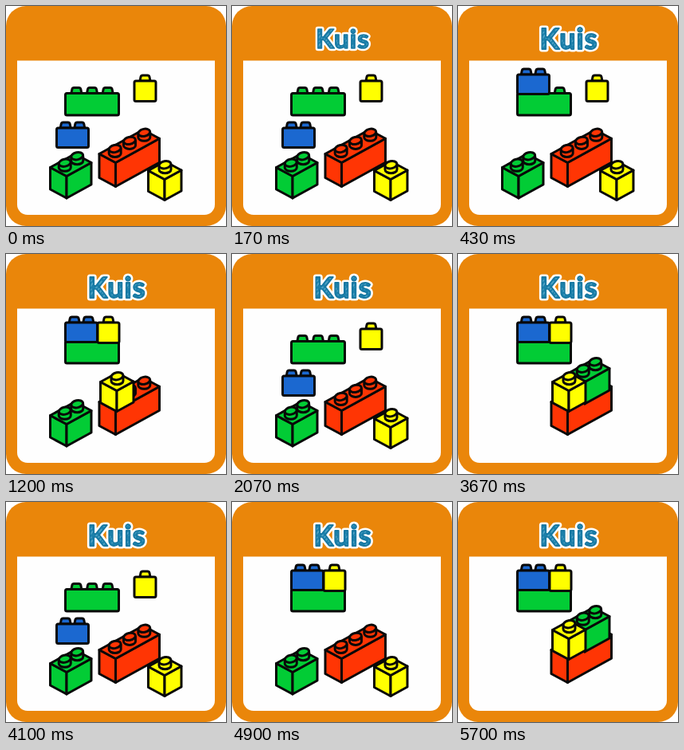
An HTML page for the animation above (6.11 s loop, 276 by 276 pixels).

```html
<!DOCTYPE html>
<html lang="id">
<head>
<meta charset="utf-8">
<title>Kuis</title>
<style>
  html, body { margin: 0; width: 100%; height: 100%; overflow: hidden; background: #fff; }
  svg { display: block; width: 100vw; height: 100vh; }
  #bricks { stroke: #080808; stroke-width: 3; stroke-linejoin: round; }
  text { font: 700 36px Lato, "Open Sans", sans-serif; text-anchor: middle; letter-spacing: 1px; stroke-linejoin: round; }
</style>
</head>
<body>
<svg viewBox="0 0 276 276">
  <defs>
    <pattern id="brush" width="9" height="7" patternUnits="userSpaceOnUse" patternTransform="rotate(-50)">
      <rect width="9" height="7" fill="#1b80ab"/>
      <path d="M1 2H6M4 5.3H8" stroke="#7cc3de" stroke-linecap="round"/>
    </pattern>
  </defs>
  <rect width="276" height="276" rx="25" fill="#ea860a"/>
  <path d="M14 68.6H262V249a13 13 0 0 1-13 13H27a13 13 0 0 1-13-13Z" fill="#fefefe"/>
  <g id="bricks"></g>
  <g id="title">
    <text x="139" y="54.5" fill="#fff" stroke="#fff" stroke-width="7">Kuis</text>
    <text x="139" y="54.5" fill="url(#brush)" stroke="#1778a2" stroke-width="1.8">Kuis</text>
  </g>
</svg>
<script>
const LOOP = 6110, STEP = 400, CYCLES = [0, 2070, 4100];
const GREEN = '#02cc35', BLUE = '#1b68d0', YELLOW = '#ffff00', RED = '#ff3504';
const root = document.getElementById('bricks');
const title = document.getElementById('title');

const each = (n, fn) => Array.from({ length: n }, (_, i) => fn(i)).join('');

// Side view, (x, y) is the top left corner of the body.
function flatBrick(x, y, w, h, n) {
  const gap = 0.88 * w / n;
  return each(n, i => {
    const cx = x + w / 2 + (i - (n - 1) / 2) * gap;
    return `<path d="M${cx - 6.5} ${y}l1-5q.5-2 2.5-2h6q2 0 2.5 2l1 5Z"/>`;
  }) + `<rect x="${x}" y="${y}" width="${w}" height="${h}" rx="2"/>`;
}

// Corner view, (x, y) is the nearest bottom corner and `run` the long side.
function boxBrick(x, y, run, h, n) {
  const rise = 0.55 * run, top = y - h, side = 'l-20.5-11';
  const studs = each(n, i => {
    const k = (i + 0.5) / n;
    const cx = x - 10 + run * k, cy = top - 12.5 - rise * k;
    return `<path d="M${cx - 7.5} ${cy}v6a7.5 4.5 0 0 0 15 0v-6Z"/>` +
      `<ellipse cx="${cx}" cy="${cy}" rx="7.5" ry="4.5" transform="rotate(-12 ${cx} ${cy})"/>`;
  });
  return `<path d="M${x} ${y}${side}v${-h}l20.5 11Z"/>` +
    `<path d="M${x} ${y}l${run} ${-rise}v${-h}L${x} ${top}Z"/>` +
    `<path d="M${x} ${top}${side}l${run} ${-rise}l20.5 11Z"/>` + studs;
}

// Listed in paint order; a brick jumps by `by` at its numbered step.
const bricks = [
  { fill: GREEN, art: flatBrick(74.5, 109.5, 67, 27.5, 3) },
  { fill: BLUE, art: flatBrick(63.5, 153, 40, 24.5, 2), step: 1, by: [11, -67] },
  { fill: YELLOW, art: flatBrick(161, 94, 27, 25.5, 1), step: 2, by: [-46, -8] },
  { fill: RED, art: boxBrick(137.5, 226.5, 55, 30, 3) },
  { fill: GREEN, art: boxBrick(76, 241, 31, 27.5, 2), step: 4, by: [83, -53] },
  { fill: YELLOW, art: boxBrick(199, 243.5, 21, 26, 1), step: 3, by: [-60, -46] }
];
for (const b of bricks) {
  b.el = document.createElementNS('http://www.w3.org/2000/svg', 'g');
  b.el.setAttribute('fill', b.fill);
  b.el.innerHTML = b.art;
  root.append(b.el);
}

const elastic = u => u <= 0 ? 0 : u >= 1 ? 1 :
  2 ** (-10 * u) * Math.sin((u * 10 - 0.75) * 2 * Math.PI / 3) + 1;

function draw(t) {
  const start = CYCLES.findLast(c => c <= t);
  const done = Math.floor((t - start) / STEP);
  for (const { el, step, by } of bricks) {
    const [x, y] = step && done >= step ? by : [0, 0];
    el.setAttribute('transform', `translate(${x} ${y})`);
  }
  const tick = Math.floor((t + 4) * 30 / 1000) / 30;
  const s = elastic(tick / 0.5);
  title.setAttribute('transform', `translate(138.5 41) scale(${s}) translate(-138.5 -41)`);
}

const t0 = performance.now();
function frame() {
  draw((performance.now() - t0) % LOOP);
  requestAnimationFrame(frame);
}
frame();
</script>
</body>
</html>
```
